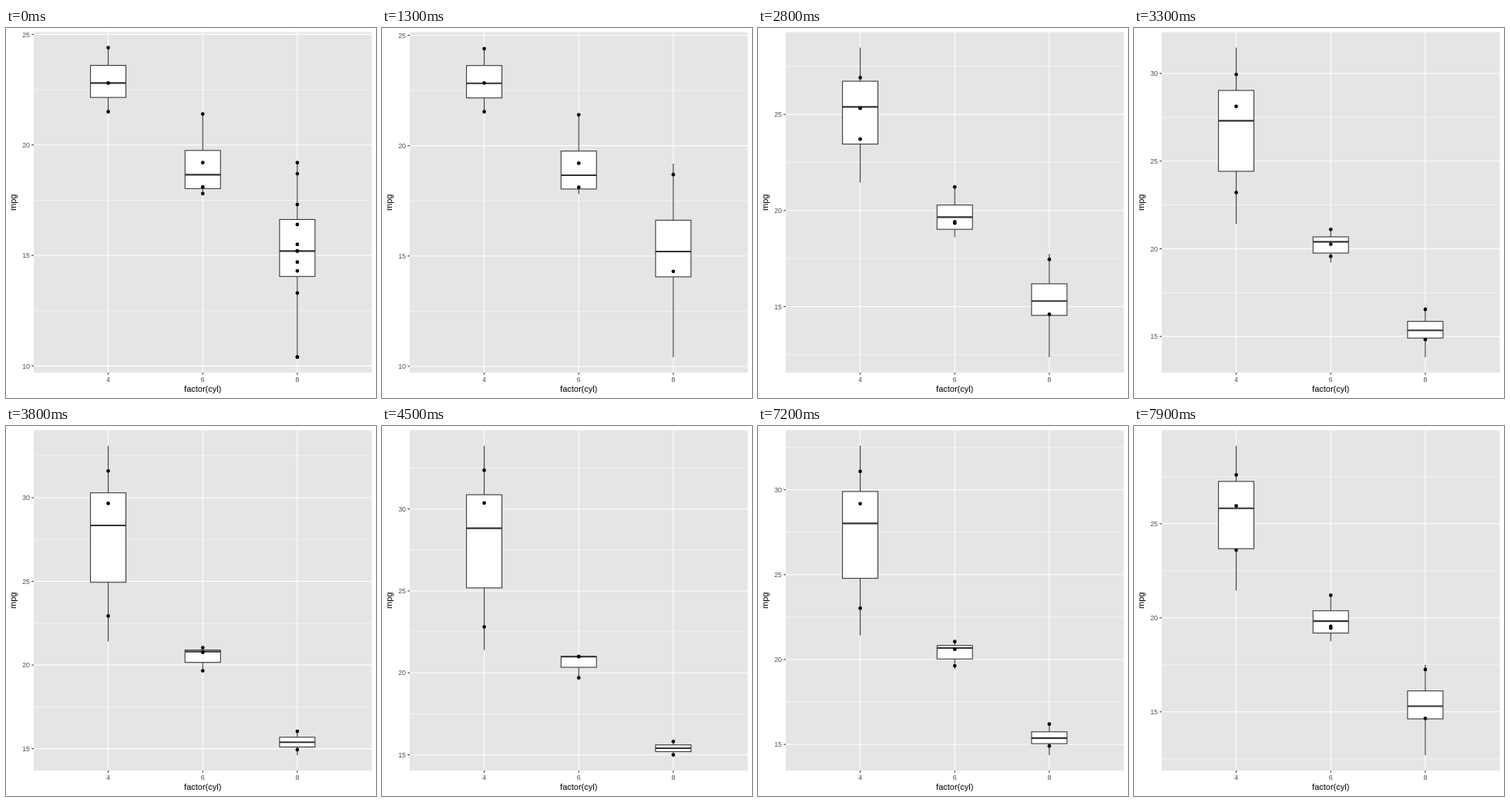
An HTML page with a canvas that plays this animation: 480 by 480 pixels, repeating every 8000 ms.

```html
<!DOCTYPE html>
<html lang="en">
<head>
<meta charset="utf-8">
<title>Box plot transition</title>
<style>
  html, body { margin: 0; width: 100%; height: 100%; overflow: hidden; background: #fff; }
  canvas { display: block; }
</style>
</head>
<body>
<canvas id="chart" width="480" height="480"></canvas>
<script>
const ctx = document.getElementById('chart').getContext('2d');
const LOOP = 8000, STEP = 100, MOVE = 4000;
const PANEL = { left: 36, right: 474.5, top: 5.5, bottom: 447 };
const GROUPS = ['4', '6', '8'];
const FONT = '"Liberation Sans", Arial, sans-serif';
const DARK = '#333';

// Two states; points move pairwise, the surplus shows only while a state rests.
const STATES = [
  [[24.4, 22.8, 21.5],
   [21.4, 18.1, 19.2, 17.8],
   [18.7, 14.3, 16.4, 17.3, 15.2, 10.4, 10.4, 14.7, 15.5, 15.2, 13.3, 19.2]],
  [[22.8, 32.4, 30.4, 33.9, 27.3, 26, 30.4, 21.4],
   [21, 21, 19.7],
   [15.8, 15]]
];

function quantiles(values) {
  const sorted = [...values].sort((a, b) => a - b);
  return [0, .25, .5, .75, 1].map(q => {
    const pos = q * (sorted.length - 1), i = Math.floor(pos);
    return mix(sorted[i], sorted[Math.ceil(pos)], pos - i);
  });
}

const BOXES = STATES.map(state => state.map(quantiles));

function mix(a, b, p) { return a + (b - a) * p; }
function ease(x) { return x < .5 ? 4 * x ** 3 : 1 - 4 * (1 - x) ** 3; }
function groupX(i) { return 255.25 + (i - 1) * 122.65; }

function line(x1, y1, x2, y2, color, width) {
  ctx.strokeStyle = color;
  ctx.lineWidth = width;
  ctx.beginPath();
  ctx.moveTo(x1, y1);
  ctx.lineTo(x2, y2);
  ctx.stroke();
}

function text(string, x, y, size, color, align = 'center') {
  ctx.font = `${size}px ${FONT}`;
  ctx.fillStyle = color;
  ctx.textAlign = align;
  ctx.fillText(string, x, y);
}

function drawBox(x, [min, q1, median, q3, max]) {
  const half = 23;
  line(x, q3, x, max, DARK, 1.07);
  line(x, q1, x, min, DARK, 1.07);
  ctx.fillStyle = '#fff';
  ctx.fillRect(x - half, q3, 2 * half, q1 - q3);
  ctx.strokeRect(x - half, q3, 2 * half, q1 - q3);
  line(x - half, median, x + half, median, DARK, 2.13);
}

function drawPoint(x, y) {
  ctx.fillStyle = '#000';
  ctx.beginPath();
  ctx.arc(x, y, 2.35, 0, 2 * Math.PI);
  ctx.fill();
}

function drawAxes(low, high, toY) {
  const { left, right, top, bottom } = PANEL;
  ctx.fillStyle = '#e5e5e5';
  ctx.fillRect(left, top, right - left, bottom - top);

  for (let v = Math.ceil(low / 2.5) * 2.5; v <= high; v += 2.5) {
    const y = toY(v), major = v % 5 === 0;
    line(left, y, right, y, '#fff', major ? 1.07 : .53);
    if (major) {
      line(left - 2.74, y, left, y, DARK, 1.07);
      text(v, 31, y + 3.15, 8.8, '#4d4d4d', 'right');
    }
  }
  GROUPS.forEach((name, i) => {
    const x = groupX(i);
    line(x, top, x, bottom, '#fff', 1.07);
    line(x, bottom, x, bottom + 2.74, DARK, 1.07);
    text(name, x, 459, 8.8, '#4d4d4d');
  });

  text('factor(cyl)', 255.25, 472, 11, '#000');
  ctx.save();
  ctx.translate(13.4, 226.25);
  ctx.rotate(-Math.PI / 2);
  text('mpg', 0, 0, 11, '#000');
  ctx.restore();
}

function draw(time) {
  const t = Math.floor(time / STEP) * STEP;
  const from = t < 6000 ? 0 : 1, to = 1 - from;
  const x = Math.min(1, Math.max(0, (t - (from ? 5900 : 900)) / MOVE));
  const p = t < 1000 ? 0 : ease(x);

  const boxes = BOXES[from].map((box, g) =>
    box.map((v, k) => mix(v, BOXES[to][g][k], p)));
  const points = p === 0 ? STATES[from] : p === 1 ? STATES[to] :
    STATES[from].map((values, g) => {
      const next = STATES[to][g];
      return values.slice(0, next.length).map((v, k) => mix(v, next[k], p));
    });

  // The view follows the data with 5% padding.
  const all = boxes.flat(), min = Math.min(...all), max = Math.max(...all);
  const pad = (max - min) * .05, low = min - pad, high = max + pad;
  const toY = v => mix(PANEL.bottom, PANEL.top, (v - low) / (high - low));

  ctx.clearRect(0, 0, 480, 480);
  drawAxes(low, high, toY);
  boxes.forEach((box, g) => drawBox(groupX(g), box.map(toY)));
  points.forEach((values, g) => values.forEach(v => drawPoint(groupX(g), toY(v))));
}

const start = performance.now();
function tick() {
  draw((performance.now() - start) % LOOP);
  requestAnimationFrame(tick);
}
tick();
</script>
</body>
</html>
```
